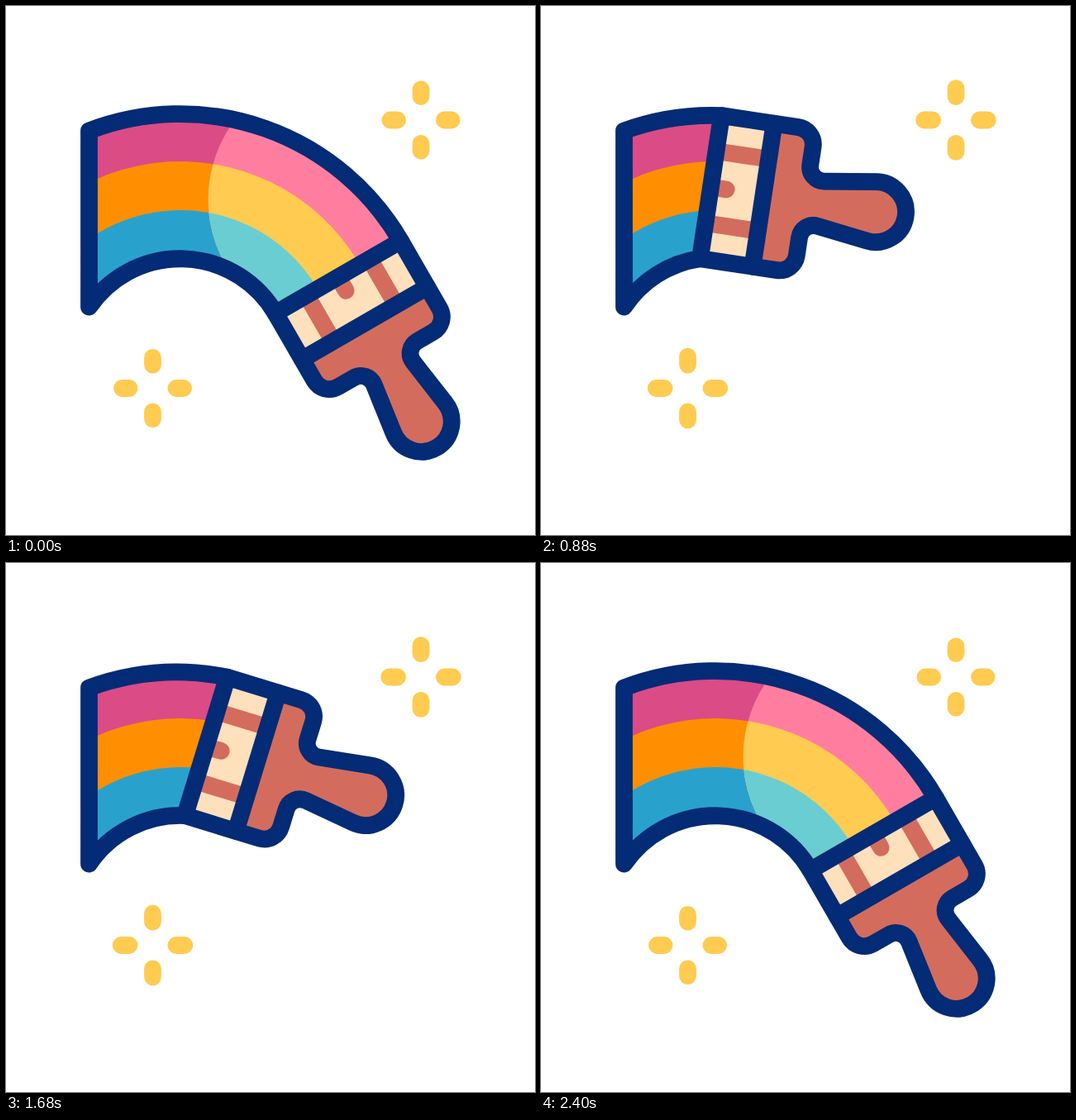
An HTML page that plays this animation: 640 by 640 pixels, repeating every 2.44 s.

```html
<!DOCTYPE html>
<html lang="en">
<head>
<meta charset="utf-8">
<title>Rainbow brush</title>
<style>
  html, body { margin: 0; width: 100%; height: 100%; overflow: hidden; background: #fff; }
  svg { display: block; width: 100vw; height: 100vh; }
</style>
</head>
<body>
<svg viewBox="0 0 640 640" fill="none" stroke-width="20.8" stroke-linecap="round" stroke-linejoin="round">
  <defs>
    <clipPath id="page"><path d="M100 0H640V640H100Z"/></clipPath>
    <clipPath id="shine"><path d="M280 134A159 159 0 0 0 280 334V500H640V134Z"/></clipPath>
    <clipPath id="painted"><path id="wipe" d="M-700-700H0V118L400 178V700H-700Z"/></clipPath>
    <path id="body" d="M0-87.5H94A21 21 0 0 1 115-66.5V-44.2A17 17 0 0 0 134.4-27.4L196.4-36.1A36.5 36.5 0 1 1 196.4 36.1L134.4 27.4A17 17 0 0 0 115 44.2V66.5A21 21 0 0 1 94 87.5H0Z"/>
  </defs>
  <g clip-path="url(#page)">
    <g clip-path="url(#painted)">
      <g id="dark"></g>
      <g id="light" clip-path="url(#shine)"></g>
    </g>
  </g>
  <path id="edge" stroke="#042b75"/>
  <g id="brush">
    <use href="#body" fill="#d36c5d"/>
    <path d="M0-87.5H64.3V87.5H0Z" fill="#ffe0bd"/>
    <path d="M0-44H64M0 44H64M0 0H19" stroke="#d36c5d" stroke-width="20.6"/>
    <use href="#body" stroke="#042b75"/>
    <path d="M64.3-87.5V87.5" stroke="#042b75"/>
  </g>
  <path id="stars" stroke="#ffcb50"/>
</svg>
<script>
const LOOP = 2440, STEP = 40;
const CX = 211, CY = 439, R_IN = 133.5, R_OUT = 308.5;
const HALF = 87.5, LEFT = 100.5, RAD = Math.PI / 180;
const $ = id => document.getElementById(id);

// Point at radius r, with the angle measured clockwise from straight up
const polar = (r, a) => [CX + r * Math.sin(a * RAD), CY - r * Math.cos(a * RAD)];
const pt = p => p.map(v => v.toFixed(2)).join(' ');

function band(r) {
  return `M${pt(polar(r, -75))}A${r} ${r} 0 0 1 ${pt(polar(r, 59.6))}` +
    `L${pt(polar(R_IN, 59.6))}A${R_IN} ${R_IN} 0 0 0 ${pt(polar(R_IN, -75))}Z`;
}

function stripes(id, colors) {
  $(id).innerHTML = [R_OUT, 251, 192]
    .map((r, i) => `<path d="${band(r)}" fill="${colors[i]}"/>`).join('');
}
stripes('dark', ['#db4b86', '#ff8f00', '#28a2cd']);
stripes('light', ['#ff7ea0', '#ffcb50', '#69cdd1']);

// Ease in and out: bezier (0.6, 0, 0.4, 1)
function ease(t, from, to) {
  const x = Math.min(1, Math.max(0, (t - from) / (to - from)));
  let lo = 0, hi = 1;
  for (let i = 0; i < 24; i++) {
    const m = (lo + hi) / 2;
    if (m * (1.8 + m * (1.6 * m - 2.4)) < x) lo = m; else hi = m;
  }
  const s = (lo + hi) / 2;
  return s * s * (3 - 2 * s);
}

function drawBrush(t) {
  const turn = 60 * (1 - ease(t, 189, 1196) + ease(t, 1336, 2184));
  const way = 1 - ease(t, 113, 1225) + ease(t, 1336, 2195);
  // The path is a little flatter than a circle
  const [x, y] = polar(220.7 - 1.8 * Math.sin(Math.PI * way), -11.3 + 71.1 * way);
  const move = `translate(${x.toFixed(2)} ${y.toFixed(2)}) rotate(${turn.toFixed(3)})`;
  $('brush').setAttribute('transform', move);
  $('wipe').setAttribute('transform', move);

  // The outline runs up to the two corners of the ferrule
  const dx = HALF * Math.sin(turn * RAD), dy = HALF * Math.cos(turn * RAD);
  const side = r => pt([LEFT, CY - Math.sqrt(r * r - (CX - LEFT) ** 2)]);
  $('edge').setAttribute('d',
    `M${pt([x - dx, y + dy])}A${R_IN} ${R_IN} 0 0 0 ${side(R_IN)}` +
    `L${side(R_OUT)}A${R_OUT} ${R_OUT} 0 0 1 ${pt([x + dx, y - dy])}`);
}

function star(x, y, a, b) {
  return `M${x} ${y - a}V${y - b}M${x} ${y + a}V${y + b}` +
    `M${x - a} ${y}H${x - b}M${x + a} ${y}H${x + b}`;
}

function drawStars(t) {
  const reach = 37.1 + 6.5 * (1 - Math.cos(2 * Math.PI * t / 800));
  $('stars').setAttribute('d', star(502, 138, 28.4, reach) + star(177.5, 462.5, 28.4, reach));
}

const start = performance.now();
function tick() {
  const t = Math.floor((performance.now() - start) % LOOP / STEP) * STEP;
  drawBrush(t);
  drawStars(t);
  requestAnimationFrame(tick);
}
tick();
</script>
</body>
</html>
```
